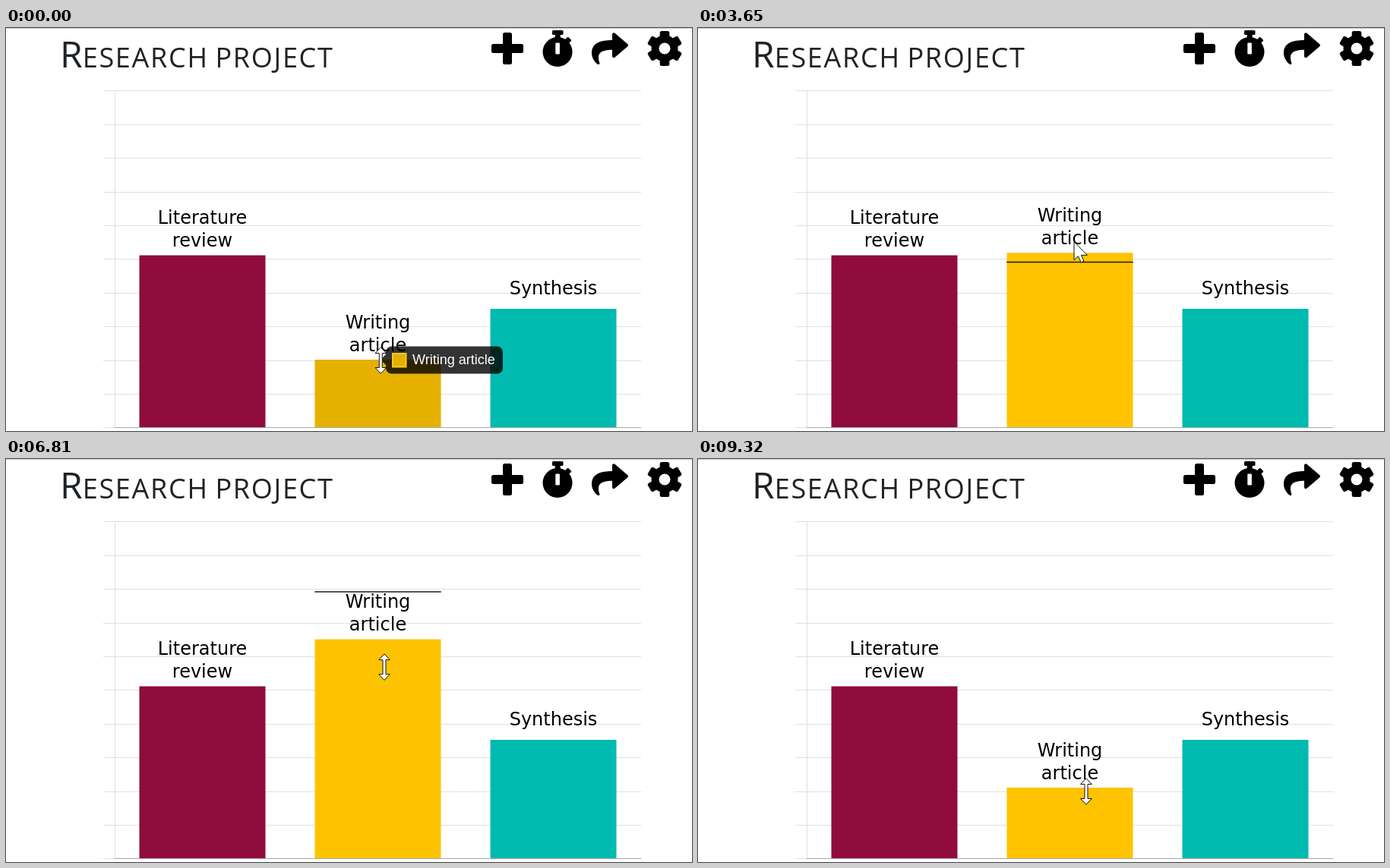
An HTML page for the animation above (9590 ms loop, 903 by 531 pixels).

```html
<!DOCTYPE html>
<html lang="en">
<head>
<meta charset="utf-8">
<title>Bar drag</title>
<style>
  html, body { margin: 0; width: 100%; height: 100%; overflow: hidden; background: #fff; }
  svg { display: block; width: 903px; height: 531px; }
  .label { font: 24px "DejaVu Sans", Verdana, sans-serif; text-anchor: middle; }
  .title { font-family: "Open Sans", "Noto Sans", sans-serif; font-size: 36px; letter-spacing: 1.7px; fill: #1f2326; }
  .tip { font: 18px "Liberation Sans", Arial, sans-serif; fill: #fff; }
  .glow { filter: drop-shadow(0 0 5px #ffdf80); }
  .cursor { fill: #fff; stroke: #111; }
</style>
</head>
<body>
<svg viewBox="0 0 903 531" xmlns="http://www.w3.org/2000/svg">
  <path d="M0 .5H903" stroke="#c4c4c4"/>
  <text class="title" y="51.5"><tspan x="71" font-size="48" letter-spacing="0">R</tspan><tspan>ESEARCH</tspan><tspan x="275.5">PROJECT</tspan></text>

  <g id="icons">
    <rect x="654" y="6" width="12" height="42" rx="2.5"/>
    <rect x="639" y="21" width="42" height="12" rx="2.5"/>
    <circle cx="726" cy="31.5" r="19.5"/>
    <rect x="719" y="3" width="14.5" height="6" rx="1.5"/>
    <rect x="722.7" y="6" width="7" height="8"/>
    <rect x="736.5" y="13" width="7" height="6" rx="1.2" transform="rotate(45 740 16)"/>
    <rect x="723.3" y="19.5" width="5.6" height="15" rx="1.2" fill="#fff"/>
    <path d="M818 21L801.7 7C800 5.5 798 6.7 798 8.5V16C783 16.2 771 19 771 33.5C771 39 775 45 778.8 47.8C780 48.7 782 47.6 781.4 46C777 32.5 783.5 29 798 28.7V37C798 39 800 40 801.7 38.6L818 24.5Q820 22.7 818 21Z"/>
    <g id="gear" transform="translate(867 27)">
      <circle r="12.5" fill="none" stroke="#000" stroke-width="10"/>
    </g>
  </g>

  <g id="grid" stroke="#e0e0e0"></g>
  <path d="M143 526.5H836" stroke="#a8a8a8"/>

  <rect x="175.5" y="299.5" width="166" height="226.5" fill="#8f0c3d"/>
  <rect x="637.5" y="370" width="166" height="156" fill="#00bab0"/>
  <rect id="bar" x="406.5" width="166"/>
  <g class="label">
    <text x="258.5" y="257.7">Literature</text>
    <text x="258.5" y="287.7">review</text>
    <text x="720.5" y="350.7">Synthesis</text>
    <g id="name">
      <text x="489.5">Writing</text>
      <text x="489.5" y="30">article</text>
    </g>
  </g>

  <g id="tip">
    <path id="caret" d="M500 430L493 437L500 444Z" fill-opacity=".8"/>
    <rect x="500" y="419.5" width="154" height="36" rx="7.5" fill-opacity=".8"/>
    <rect x="509" y="429" width="17.5" height="17.5" fill="#e6b000" stroke="#ffc81e" stroke-width="2"/>
    <text class="tip" x="535" y="443">Writing article</text>
  </g>
  <path id="mark" d="M406.3 0H572.7" stroke="#1c1c1c" stroke-width="1.5"/>

  <path id="resize" class="cursor" d="M0-17.3L7.3-9.5H2V9.5H7.3L0 17.3L-7.3 9.5H-2V-9.5H-7.3Z"/>
  <path id="arrow" class="cursor" d="M0 0V24L5.5 19L9.3 27.3L13 25.6L9.4 17.6H17.4Z"/>
</svg>

<script>
const LOOP = 9590, CUT = 9320, BASE = 526, REST = 437, EASE = 1000, SAMPLES = 48;
const $ = id => document.getElementById(id);

// Each drag pulls the bar top to a new height; grip is the pointer's offset from it
const drags = [
  { start: 530, end: 1400, to: 308, x: 493.3, grip: 1 },
  { start: 3340, end: 4490, to: 174.5, x: 495, grip: 1.5 },
  { start: 6140, end: 7690, to: 433, x: 498, grip: 5 }
];
const [first, , last] = drags;
const release = d => d.end + 500;

function add(parent, tag, attrs) {
  const el = document.createElementNS("http://www.w3.org/2000/svg", tag);
  for (const k in attrs) el.setAttribute(k, attrs[k]);
  parent.append(el);
}

for (let i = 0; i < 10; i++)
  add($("grid"), "path", { d: `M128 ${Math.round(82.4 + i * 44.4) + .5}H836` });
add($("grid"), "path", { d: "M143.5 82V526M128 526.5H143" });
for (let i = 0; i < 6; i++)
  add($("gear"), "rect", { x: -6.3, y: -23, width: 12.6, height: 10, rx: 2.5, transform: `rotate(${i * 60})` });

const clamp = p => Math.min(1, Math.max(0, p));
const fade = (t, from) => (1 - clamp((t - from) / EASE)) ** 4;

// Height the pointer asks for
function target(t) {
  return drags.reduce((y, d) => y + (d.to - y) * clamp((t - d.start) / (d.end - d.start)) ** 1.2, REST);
}

// The bar trails the pointer: each small move is eased out over EASE
function barTop(t) {
  let sum = 0;
  for (let i = 0; i < SAMPLES; i++)
    sum += target(t - EASE * (1 - ((i + .5) / SAMPLES) ** .25));
  return sum / SAMPLES;
}

const show = (el, on) => el.setAttribute("visibility", on ? "visible" : "hidden");
const move = (el, x, y) => el.setAttribute("transform", `translate(${x} ${y})`);

function draw(t) {
  const top = barTop(t), aim = target(t);
  const drag = drags.findLast(d => t >= d.start) || first;
  const back = 1 - fade(t, release(last));
  const hovered = t < CUT ? back : 0;
  const hover = drag === drags[1] ? 0 : Math.max(fade(t, drag.start + 60), hovered);

  $("bar").setAttribute("y", top);
  $("bar").setAttribute("height", BASE - top);
  $("bar").setAttribute("fill", `rgb(${255 - 25 * hover},${195 - 19 * hover},0)`);

  // A tall bar carries its label inside
  const inside = aim < 200;
  move($("name"), 0, top + (inside ? 41 : -41.5));
  $("name").setAttribute("class", inside ? "glow" : "");

  const dragging = t >= drag.start && t < release(drag);
  $("tip").setAttribute("opacity", Math.max(fade(t, 1365), hovered));
  show($("mark"), dragging);
  show($("caret"), !dragging);
  move($("mark"), 0, target(drag.start) + .5);

  const arrow = t > 1170 && t < last.start;
  show($("arrow"), arrow);
  show($("resize"), !arrow);
  move($(arrow ? "arrow" : "resize"), drag.x + 13 * back, aim + drag.grip);
}

const start = performance.now();
function tick() {
  draw((performance.now() - start) % LOOP);
  requestAnimationFrame(tick);
}
tick();
</script>
</body>
</html>
```
